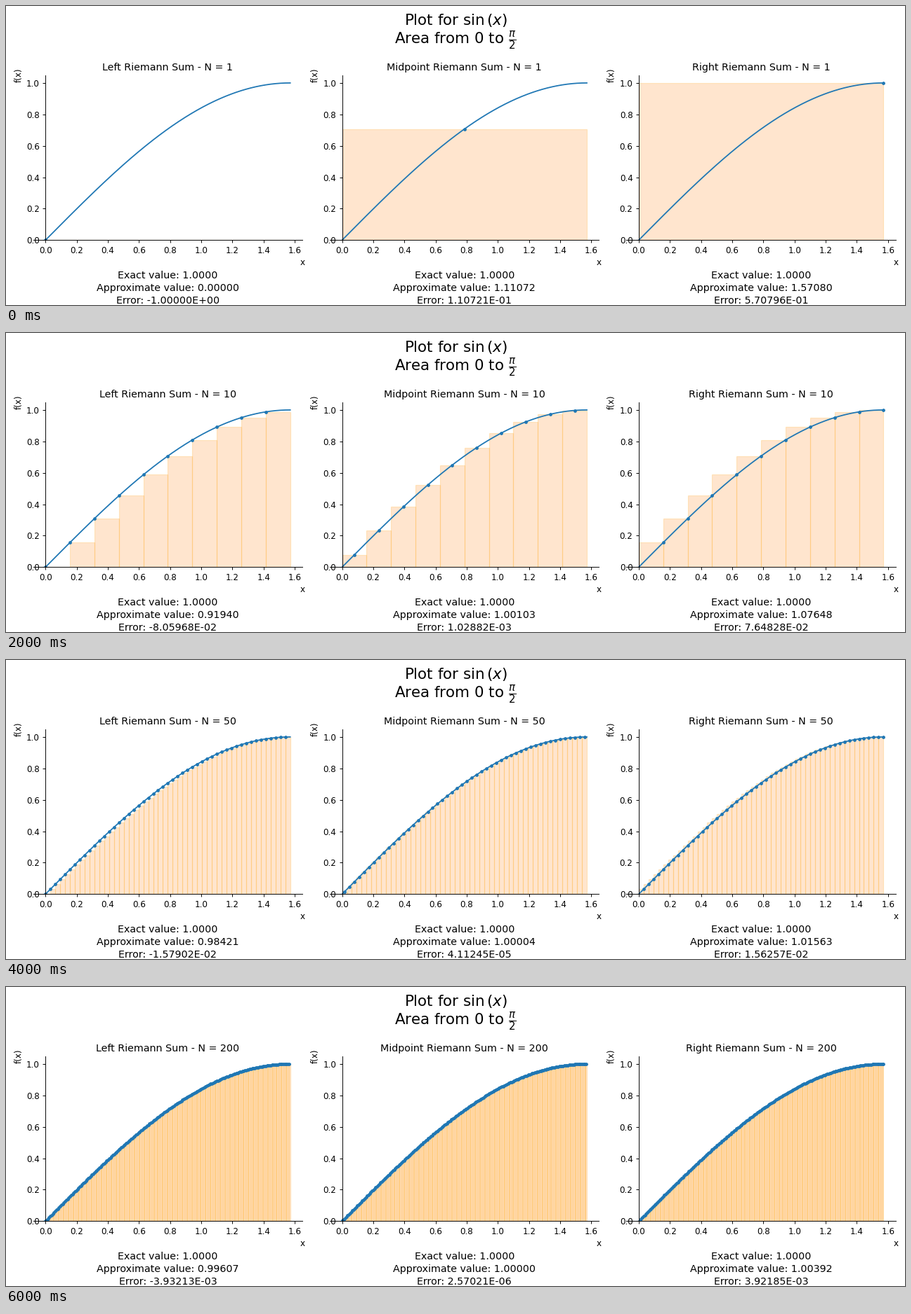
These frames come from a looping animation (1280x427 px, 7000 ms). A matplotlib script:

```python
import numpy as np
import matplotlib.pyplot as plt
from matplotlib.animation import FuncAnimation

W, H = 1280, 427
DPI = W / 15
A, B = 0, np.pi / 2
EXACT = 1.0
COUNTS = [1, 5, 10, 20, 50, 100, 200]
RULES = [("Left", 0), ("Midpoint", 0.5), ("Right", 1)]  # sample place in each strip

# axes box and note baselines in pixels, measured from the lower left corner
LEFT, BOTTOM, WIDTH, HEIGHT, PITCH = 38.78, 92.65, 383.3, 235.7, 422.35
NOTE_ROWS = [38, 20, 2]

plt.rcParams["font.family"] = "DejaVu Sans"
fig = plt.figure(figsize=(W / DPI, H / DPI), dpi=DPI, facecolor="white")
fig.suptitle(r"Plot for $\sin{\left(x \right)}$" "\n"
             r"Area from $0$ to $\frac{\pi}{2}$", fontsize=18, linespacing=1.08)


def make_panel(i):
    left = LEFT + i * PITCH
    ax = fig.add_axes([left / W, BOTTOM / H, WIDTH / W, HEIGHT / H])
    pad = 0.05 * (B - A)
    ax.set_xlim(A - pad, B + pad)
    ax.set_ylim(0, 1.05)
    for side in ("right", "top"):
        ax.spines[side].set_visible(False)
    for side in ("left", "bottom"):
        ax.spines[side].set_position(("data", 0))
    ax.set_xlabel("x", x=1)
    ax.set_ylabel("f(x)", y=1)
    x = np.linspace(A, B, 300)
    ax.plot(x, np.sin(x), color="C0")
    notes = [fig.text((left + WIDTH / 2) / W, row / H, "", fontsize=12,
                      ha="center", va="baseline") for row in NOTE_ROWS]
    return ax, notes


panels = [make_panel(i) for i in range(len(RULES))]
drawn = []


def clear():
    for artist in drawn:
        artist.remove()
    drawn.clear()


def update(k):
    clear()
    n = COUNTS[k]
    dx = (B - A) / n
    edges = A + dx * np.arange(n)
    for (ax, notes), (name, shift) in zip(panels, RULES):
        x = edges + shift * dx
        y = np.sin(x)
        total = y.sum() * dx
        drawn.append(ax.bar(edges, y, width=dx, align="edge", alpha=0.2,
                            color="C1", edgecolor="orange"))
        drawn.extend(ax.plot(x, y, ".", color="C0"))
        ax.set_title(f"{name} Riemann Sum - N = {n}")
        lines = (f"Exact value: {EXACT:.4f}",
                 f"Approximate value: {total:.5f}",
                 f"Error: {total - EXACT:.5E}")
        for note, line in zip(notes, lines):
            note.set_text(line)
    return []


anim = FuncAnimation(fig, update, frames=len(COUNTS), init_func=clear,
                     interval=1000, repeat=True, repeat_delay=0, blit=False)
plt.show()
```
